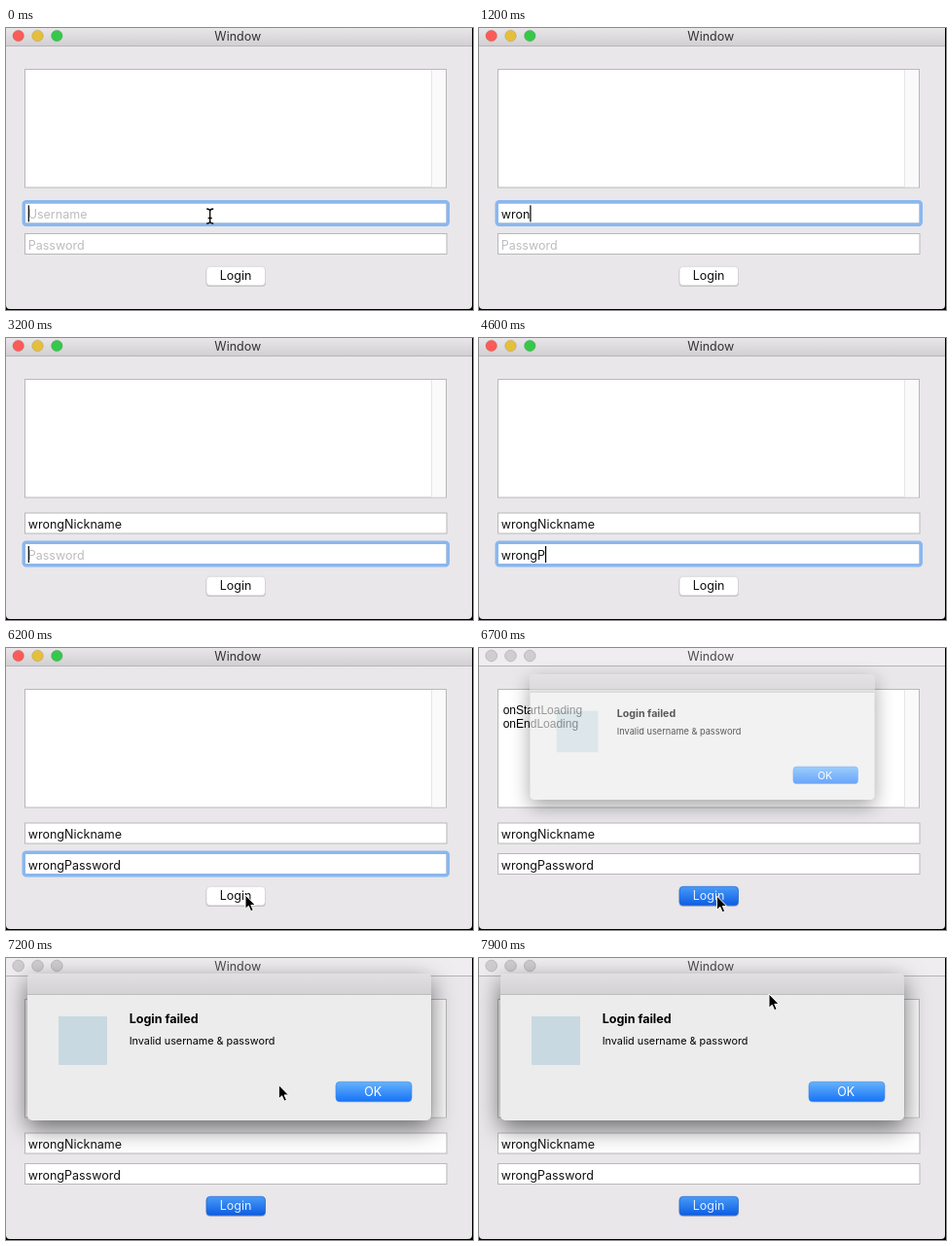
These frames come from a looping animation (480x290 px, 8000 ms). An HTML page:

```html
<!DOCTYPE html>
<html lang="en">
<head>
<meta charset="utf-8">
<title>Login window</title>
<style>
  html, body { margin: 0; width: 100%; height: 100%; overflow: hidden; background: #000; }
  svg { display: block; width: 480px; height: 290px; }
  text { font: 12.5px Inter, Roboto, sans-serif; fill: #111; white-space: pre; }
  .mid { text-anchor: middle; }
  .hint { fill: #bdbcbe; }
  .box { fill: #fff; stroke: #b9b7ba; }
  .log { font: 12px "Liberation Sans", Arial, sans-serif; fill: #000; }
  .head { font-weight: 700; fill: #000; }
  .info { font-size: 10.8px; fill: #000; }
  #alertBox { filter: drop-shadow(0 8px 12px rgba(0, 0, 0, .55)); }
</style>
</head>
<body>
<svg viewBox="0 0 480 290">
  <defs>
    <linearGradient id="bar" x2="0" y2="1"><stop stop-color="#e8e6e8"/><stop offset="1" stop-color="#d2d0d2"/></linearGradient>
    <linearGradient id="sheetBar" x2="0" y2="1"><stop stop-color="#e2e0e2"/><stop offset="1" stop-color="#d3d1d3"/></linearGradient>
    <linearGradient id="blue" x2="0" y2="1"><stop stop-color="#4a9cf8"/><stop offset="1" stop-color="#0c5ce2"/></linearGradient>
    <linearGradient id="okBlue" x2="0" y2="1"><stop stop-color="#66b3fb"/><stop offset="1" stop-color="#1673f7"/></linearGradient>
  </defs>

  <path fill="#e9e7ea" d="M0 0H479V285Q479 289 475 289H4Q0 289 0 285Z"/>
  <rect id="titleBar" width="479" height="18"/>
  <path stroke="#b7b5b7" d="M0 18.5H479"/>
  <g id="lights" stroke-width=".8"></g>
  <text id="title" class="mid" x="238.3" y="12.7">Window</text>

  <rect class="box" x="19.5" y="42.5" width="433" height="121.5"/>
  <path fill="#fafafa" d="M438 43H452V163.5H438Z"/>
  <path stroke="#e6e5e7" d="M437.5 43V163.5"/>
  <g id="log">
    <text class="log" x="24.7" y="68">onStartLoading</text>
    <text class="log" x="24.7" y="82">onEndLoading</text>
  </g>

  <rect class="box" x="19.5" y="180" width="433.5" height="21"/>
  <rect class="box" x="19.5" y="211.5" width="433.5" height="21"/>
  <rect id="ring" fill="none" stroke="#8ab7ee" stroke-width="3.4" rx="2.5"/>
  <text id="user" x="22.7" y="196"></text>
  <text id="pass" x="22.7" y="227.7"></text>
  <rect id="caret" width="1.2" height="17"/>

  <rect x="205.5" y="246" width="61.5" height="20" rx="4" fill="#c3c1c4"/>
  <rect id="button" x="206" y="245.3" width="60.5" height="19.5" rx="3.8" stroke-width=".7"/>
  <text id="login" class="mid" x="236" y="259.4">Login</text>

  <g id="alert">
    <g id="alertBox">
      <rect x="22" y="16" width="415" height="151" rx="5" fill="#ececec"/>
      <path fill="url(#sheetBar)" d="M22 37V21Q22 16 27 16H432Q437 16 437 21V37Z"/>
    </g>
    <path stroke="#bebcbe" d="M22 37.5H437"/>
    <rect x="54" y="60" width="50" height="50" fill="#c9d9e1"/>
    <text class="head" x="126.7" y="67">Login failed</text>
    <text class="info" x="126.7" y="89">Invalid username &amp; password</text>
    <rect x="339" y="127.3" width="78" height="20.5" rx="4" fill="url(#okBlue)" stroke="#3d87e6" stroke-width=".6"/>
    <text class="mid" x="377.3" y="142.2" fill="#fff" style="fill:#fff">OK</text>
  </g>

  <path id="arrow" fill="#000" stroke="#fff" stroke-width="1" stroke-linejoin="round"
    d="M0 0V14.3L3.3 11.3L5.7 16.7L8.2 15.6L5.8 10.4H10.2Z"/>
  <path id="beam" fill="none" stroke="#000" stroke-width="1.3"
    d="M-3.5 -7.5Q0 -7.5 0 -5Q0 -7.5 3.5 -7.5M0 -5.5V5.5M-3.5 7.5Q0 7.5 0 5Q0 7.5 3.5 7.5M-2 2H2"/>
</svg>
<script>
const LOOP = 8000, STEP = 100;
const $ = id => document.getElementById(id);
const set = (el, attrs) => { for (const k in attrs) el.setAttribute(k, attrs[k]); };
const show = (el, on) => { el.style.display = on ? "" : "none"; };
const clamp = v => Math.max(0, Math.min(1, v));

// Key press times, one per letter
const USER = { text: "wrongNickname", hint: "Username",
  keys: [600, 800, 1000, 1200, 1400, 1600, 1800, 1900, 2000, 2100, 2200, 2300, 2300] };
const PASS = { text: "wrongPassword", hint: "Password",
  keys: [3300, 3500, 3700, 3900, 4200, 4600, 4700, 4800, 5000, 5100, 5200, 5400, 5600] };
const TAB = 2900, PRESS = 6300, RUN = 6400, POP = 6600;

// Pointer path: time, x, y
const PATH = [
  [0, 209.7, 193.5], [5900, 209.7, 193.5], [6200, 246, 254], [6600, 244.5, 255],
  [6900, 244.5, 255], [7200, 280.3, 130.5], [7400, 280.3, 130.5], [7900, 298, 37]
];

const lights = ["#fc5b57", "#e5bf3c", "#35c84a"].map((color, i) => {
  const c = document.createElementNS("http://www.w3.org/2000/svg", "circle");
  set(c, { cx: 12.7 + i * 19.8, cy: 8, r: 5.8 });
  $("lights").append(c);
  return { c, color };
});

function pointerAt(t) {
  let i = 1;
  while (i < PATH.length - 1 && PATH[i][0] < t) i++;
  const [a, b] = [PATH[i - 1], PATH[i]];
  const p = clamp((t - a[0]) / (b[0] - a[0]));
  const e = p * p * (3 - 2 * p);
  return [a[1] + (b[1] - a[1]) * e, a[2] + (b[2] - a[2]) * e];
}

function drawField(el, field, t) {
  const typed = field.text.slice(0, field.keys.filter(k => k <= t).length);
  el.textContent = typed || field.hint;
  el.setAttribute("class", typed ? "" : "hint");
  return typed ? el.getComputedTextLength() : 0;
}

function drawFocus(t, userWidth, passWidth) {
  const second = t >= TAB;
  const p = second ? clamp((t - TAB + STEP) / 400) : 1;
  const out = 1.3 + 6 * (1 - p);
  set($("ring"), { x: 19.5 - out, y: (second ? 211.5 : 180) - out,
    width: 433.5 + 2 * out, height: 21 + 2 * out, opacity: p });
  show($("ring"), t < RUN);
  set($("caret"), { x: 22.7 + (second ? passWidth : userWidth), y: second ? 214 : 182.3 });
  show($("caret"), t < 100 || (t >= 600 && t < 6000));
}

function drawWindow(t) {
  const active = t < RUN, pressed = t >= PRESS;
  set($("titleBar"), { fill: active ? "url(#bar)" : "#efedef" });
  $("title").style.fill = active ? "#333" : "#4c4b4c";
  for (const { c, color } of lights)
    set(c, { fill: active ? color : "#cfcdcf", stroke: active ? "#0002" : "#b4b2b4" });
  show($("log"), !active);
  set($("button"), { fill: pressed ? "url(#blue)" : "#fff", stroke: pressed ? "#2468d0" : "#cfcdd0" });
  $("login").style.fill = pressed ? "#e6effc" : "#111";
}

function drawAlert(t) {
  const rest = (1 - clamp((t - POP) / 300)) ** 2;
  const s = 1 - .33 * rest;
  show($("alert"), t >= POP);
  set($("alert"), { opacity: 1 - .8 * rest,
    transform: `translate(229.5 91.5) scale(${s}) translate(-229.5 -91.5)` });
}

function drawPointer(t) {
  const [x, y] = pointerAt(t);
  const visible = t < 600 || t >= 5900;
  const overField = t < PRESS && y < 233;
  show($("beam"), visible && overField);
  show($("arrow"), visible && !overField);
  for (const id of ["beam", "arrow"]) set($(id), { transform: `translate(${x} ${y})` });
}

function draw(time) {
  const t = Math.floor((time % LOOP) / STEP) * STEP;
  drawFocus(t, drawField($("user"), USER, t), drawField($("pass"), PASS, t));
  drawWindow(t);
  drawAlert(t);
  drawPointer(t);
}

const start = performance.now();
function tick() {
  draw(performance.now() - start);
  requestAnimationFrame(tick);
}
tick();
</script>
</body>
</html>
```
